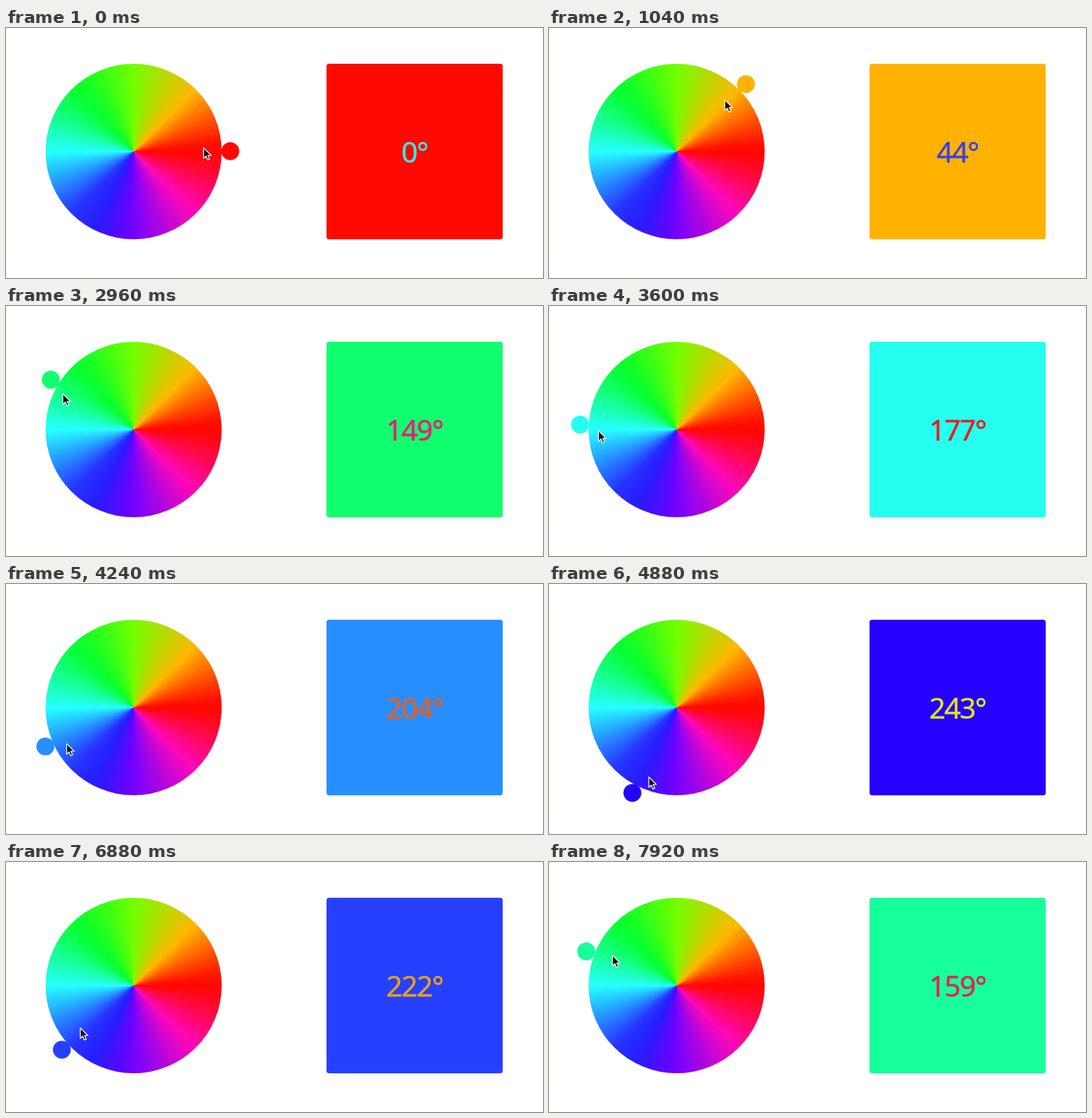
An HTML page for the animation above (8000 ms loop, 732x342 px).

```html
<!DOCTYPE html>
<html lang="en">
<head>
<meta charset="utf-8">
<title>Hue wheel</title>
<style>
  html, body { margin: 0; width: 100%; height: 100%; overflow: hidden; background: #fff; }
  .stage { position: relative; width: 732px; height: 342px; overflow: hidden; }
  .stage > * { position: absolute; }
  .wheel { left: 54px; top: 49px; width: 240px; height: 240px; border-radius: 50%; }
  .ball, .swatch { background: currentColor; box-shadow: 0 0 1px; }
  .ball { left: -12px; top: -12px; width: 24px; height: 24px; border-radius: 50%; }
  .swatch {
    left: 437px; top: 49px; width: 240px; height: 240px; border-radius: 4px;
    font: 400 39px/240px "Open Sans", "Noto Sans", sans-serif;
    letter-spacing: -1.5px; text-align: center;
  }
  .label { opacity: .92; -webkit-text-stroke: .6px; }
  .cursor { left: 0; top: 0; overflow: visible; }
</style>
</head>
<body>
<div class="stage">
  <div class="wheel"></div>
  <div class="ball"></div>
  <div class="swatch"><span class="label"></span></div>
  <svg class="cursor" width="12" height="18">
    <path transform="scale(1.06)" d="M.5 1V14.6L3.7 11.7 5.8 16.6 8.2 15.6 6.1 10.8H10.3Z"
          fill="#15121c" stroke="#fff" stroke-width="1.1" stroke-linejoin="round"/>
  </svg>
</div>
<script>
  const LOOP = 8000, STEP = 80;
  const CENTER = { x: 174, y: 168.6 };
  const ORBIT = 131.7;

  // Pointer path: time, degrees, distance from the centre
  const PATH = [
    [0, 0, 95], [1920, 85, 98.5], [2960, 149, 109], [4240, 204, 104],
    [5640, 273, 99], [6880, 222, 93], [8000, 154.5, 98]
  ];

  const pick = name => document.querySelector("." + name);
  const wheel = pick("wheel"), ball = pick("ball"), swatch = pick("swatch");
  const label = pick("label"), cursor = pick("cursor");

  const lerp = (a, b, u) => a + (b - a) * u;
  const slope = (i, k) => (PATH[i + 1][k] - PATH[i][k]) / (PATH[i + 1][0] - PATH[i][0]);

  // Harmonic-mean tangents keep the curve from overshooting
  function tangent(i, k) {
    const a = slope(Math.max(i - 1, 0), k);
    const b = slope(Math.min(i, PATH.length - 2), k);
    return a * b <= 0 ? 0 : 2 * a * b / (a + b);
  }

  function sample(t, k) {
    let i = 0;
    while (i < PATH.length - 2 && t >= PATH[i + 1][0]) i++;
    const span = PATH[i + 1][0] - PATH[i][0], u = (t - PATH[i][0]) / span;
    return lerp(PATH[i][k], PATH[i + 1][k], u * u * (3 - 2 * u))
      + span * u * (1 - u) * ((1 - u) * tangent(i, k) - u * tangent(i + 1, k));
  }

  // Fully saturated hue as red, green and blue from 0 to 1
  const hue = deg => [0, 4, 2].map(k =>
    Math.min(1, Math.max(0, Math.abs((deg / 60 + k) % 6 - 3) - 1)));

  // Screen response: darker midtones, blue spilling into red
  function css(rgb) {
    const [r, g, b] = rgb.map(c => c ** 1.15);
    const out = [Math.max(r, b * .15), Math.max(g, r * .03), b];
    return `rgb(${out.map(c => Math.round(c * 255))})`;
  }

  // The wheel blends straight between hues 45 degrees apart
  function wheelColor(deg) {
    const from = Math.floor(deg / 45) * 45;
    const next = hue(from + 45);
    return css(hue(from).map((c, k) => lerp(c, next[k], (deg - from) / 45)));
  }

  function place(el, deg, radius) {
    const a = deg * Math.PI / 180;
    const x = CENTER.x + radius * Math.cos(a);
    const y = CENTER.y - radius * Math.sin(a);
    el.style.transform = `translate(${x}px, ${y}px)`;
  }

  function draw(time) {
    const t = Math.floor(time % LOOP / STEP) * STEP;
    const deg = sample(t, 1), shown = Math.round(deg);
    ball.style.color = swatch.style.color = css(hue(shown));
    label.style.color = css(hue(shown + 180));
    label.textContent = shown + "°";
    place(ball, deg, ORBIT);
    // The pointer runs one step ahead of the ball
    place(cursor, sample(t + STEP, 1), sample(t, 2));
  }

  const ring = [];
  for (let deg = 360; deg >= 0; deg -= 5) ring.push(wheelColor(deg));
  wheel.style.background = `conic-gradient(from 90deg, ${ring.join(", ")})`;

  const start = performance.now();
  function tick() {
    draw(performance.now() - start);
    requestAnimationFrame(tick);
  }
  tick();
</script>
</body>
</html>
```
